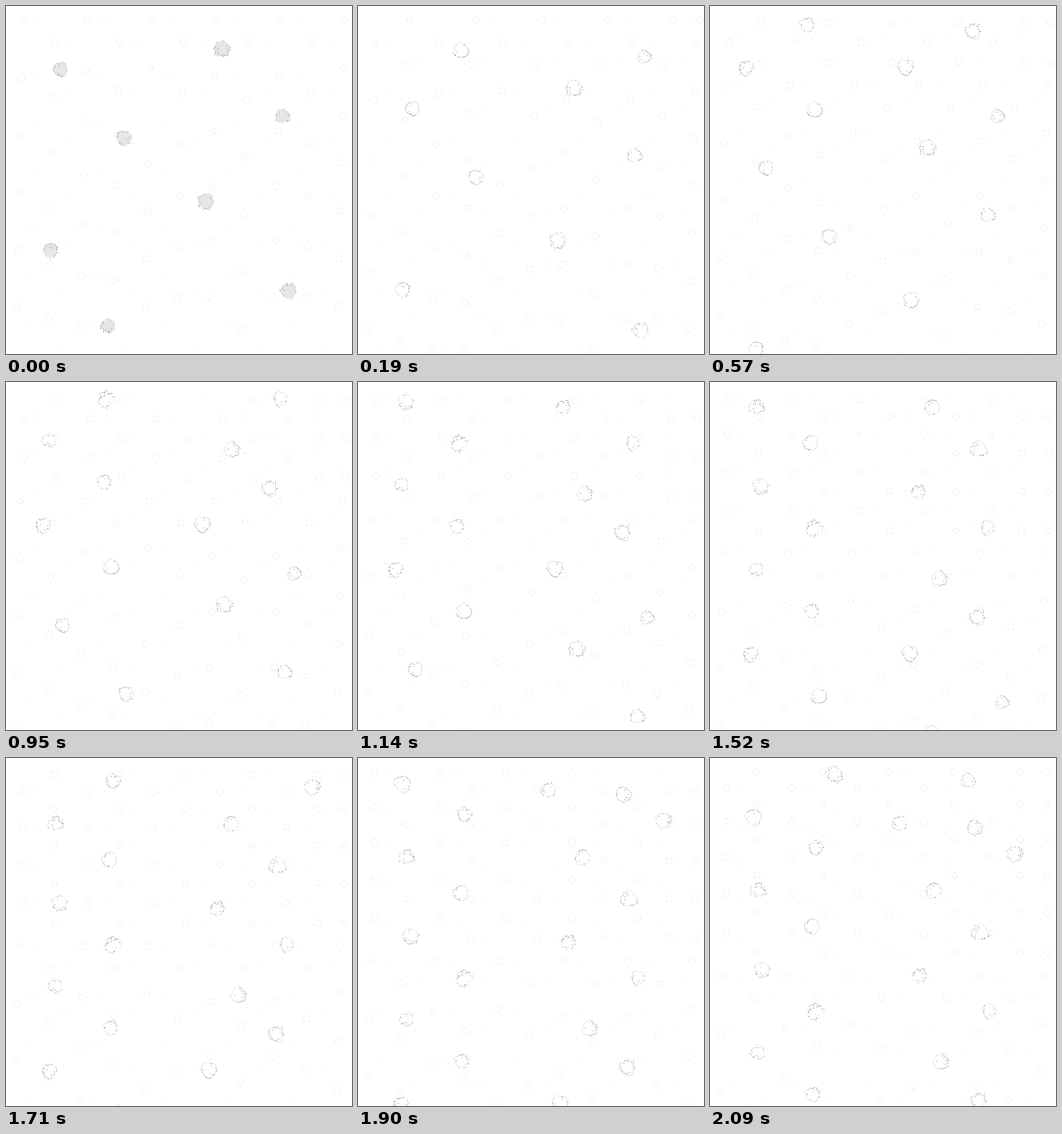
Animation, 478 px wide and 480 px high, one loop 2280 ms. Source, as an HTML page with a canvas:

```html
<!DOCTYPE html>
<html lang="en">
<head>
<meta charset="utf-8">
<title>Drifting flakes</title>
<style>
html, body { margin: 0; width: 100%; height: 100%; overflow: hidden; background: #fff; }
canvas { display: block; }
</style>
</head>
<body>
<canvas id="stage" width="478" height="480"></canvas>
<script>
const ctx = document.getElementById('stage').getContext('2d');
const W = 478, H = 480, STEP = 190, LOOP = 2280, TAU = Math.PI * 2;

// Where each puff sits at the start; those with low y fall in from above.
const puffSpots = [
  [75, 87], [298, 59], [382, 152], [163, 182], [276, 269], [61, 337], [390, 393], [141, 441],
  [142, 7], [395, 16], [48, -50], [268, -52], [132, -110], [361, -101],
  [56, -168], [309, -155], [136, -224], [376, -225], [62, -282], [279, -274],
  [131, -342], [363, -334], [56, -392], [299, -391], [136, -451], [411, -442],
  [50, -492], [252, -484], [162, -552], [346, -543], [356, -478]
];

// Key poses of the puffs' sway and fall; the steps between lie halfway.
const sway = [0, 0, 2, 2.5, 4.5, 12, 10];
const fall = [0, 54, 136, 248, 370, 482, 574];

function random(seed) {
  return () => (seed = (seed * 16807) % 2147483647) / 2147483647;
}

function makeRings() {
  const rnd = random(7321), rings = [];
  const add = (x, y) => rings.push({ x, y, r: 3.7 + rnd() * 1.3, turn: rnd() * TAU });

  // Leaning columns already on stage
  for (let c = 0; c < 11; c++) {
    const gap = 72 + 7 * Math.cos(c * .9);
    for (let y = c % 2 ? 50 : 20; y < 470; y += gap) add(24 + 44.4 * c - y * .022, y);
  }
  // Staggered rows waiting above
  for (let k = 0; k < 11; k++) {
    const y = -12 - 28 * k + .3 * k * k;
    for (let j = 0; j < 5; j++) add((k % 2 ? 29 : 72) + 91 * j, y);
    if (k % 2 === 0) add(473, y);
  }
  return rings;
}

function makeDots() {
  const dots = [];
  for (let c = 0; c < 10; c++) {
    for (let y = c % 2 ? 48 : 22; y < 470; y += 70) dots.push([45 + 45.5 * c - y * .03, y]);
  }
  for (let k = 0; k < 12; k++) {
    for (let j = 0; j < 5; j++) dots.push([(k % 2 ? 48 : 181) + 95 * j, -10 - 25.5 * k]);
  }
  return dots;
}

function makePuff([x, y], n) {
  const rnd = random(911 + n * 577);
  for (let i = 0; i < 4; i++) rnd();
  const r = 9.5 + rnd() * 2, rough = .08 + rnd() * .3;
  const phase = rnd() * TAU, shade = rnd() * TAU, count = 36;
  const edge = [], specks = [];
  const speck = (px, py) => specks.push([Math.round(px), Math.round(py), 125 + rnd() * 75 | 0]);

  for (let i = 0; i < count; i++) {
    const a = i / count * TAU;
    const d = r * (.95 + .06 * Math.sin(3 * a + phase) + (rnd() - .5) * rough);
    const px = Math.cos(a) * d, py = Math.sin(a) * d;
    edge.push({ x: px, y: py, ink: 190 + rnd() * 60 | 0 });
    if (rnd() < .4 + .3 * Math.cos(a - shade)) speck(px, py);
  }
  for (let i = 0; i < rough * 30; i++) {
    const a = rnd() * TAU, d = r * (.45 + rnd() * .5);
    speck(Math.cos(a) * d, Math.sin(a) * d);
  }
  return { x, y, r, edge, specks };
}

const rings = makeRings(), dots = makeDots(), puffs = puffSpots.map(makePuff);

// Value of a key list at a step: the start, then one key every two steps.
function keyed(list, step) {
  const p = step ? (step + 1) / 2 : 0, i = Math.floor(p);
  return p === i ? list[i] : (list[i] + list[i + 1]) / 2;
}

const grey = v => `rgb(${v},${v},${v})`;

function drawRings(step) {
  const dx = -.65 * step, dy = 31.6 * step - .55 * step * step;
  ctx.strokeStyle = grey(228);
  ctx.lineWidth = .8;
  ctx.setLineDash([3, 1.5, 1.5, 1]);
  for (const c of rings) {
    const y = c.y + dy;
    if (y < 14 || y > H + 6) continue;
    ctx.beginPath();
    ctx.arc(c.x + dx, y, c.r, c.turn, c.turn + TAU);
    ctx.stroke();
  }
  ctx.setLineDash([]);
}

function drawDots(step) {
  const dx = -.7 * step, dy = 27.3 * step - .14 * step * step;
  ctx.strokeStyle = grey(234);
  ctx.lineWidth = .7;
  for (const [x, y] of dots) {
    if (y + dy < 17) continue;
    ctx.beginPath();
    ctx.arc(x + dx, y + dy, 1.2, 0, 4);
    ctx.stroke();
  }
}

function drawPuff(p, step, dx, dy) {
  if (p.y + dy - p.r < 8 || p.y + dy > H + 15) return;
  ctx.save();
  ctx.translate(Math.round(p.x + dx), Math.round(p.y + dy));
  ctx.beginPath();
  for (const e of p.edge) ctx.lineTo(e.x, e.y);
  ctx.closePath();
  ctx.fillStyle = step ? '#fff' : grey(230);
  ctx.fill();
  ctx.lineWidth = .7;
  p.edge.forEach((e, i) => {
    const next = p.edge[(i + 1) % p.edge.length];
    ctx.strokeStyle = grey(e.ink);
    ctx.beginPath();
    ctx.moveTo(e.x, e.y);
    ctx.lineTo(next.x, next.y);
    ctx.stroke();
  });
  for (const [x, y, ink] of p.specks) {
    ctx.fillStyle = grey(ink);
    ctx.fillRect(x, y, 1, 1);
  }
  ctx.restore();
}

function draw(step) {
  ctx.fillStyle = '#fff';
  ctx.fillRect(0, 0, W, H);
  drawDots(step);
  drawRings(step);
  const dx = keyed(sway, step), dy = keyed(fall, step);
  for (const p of puffs) drawPuff(p, step, dx, dy);
}

const start = performance.now();
let shown = 0;
draw(0);
function tick() {
  const step = Math.floor((performance.now() - start) % LOOP / STEP);
  if (step !== shown) draw(shown = step);
  requestAnimationFrame(tick);
}
requestAnimationFrame(tick);
</script>
</body>
</html>
```
